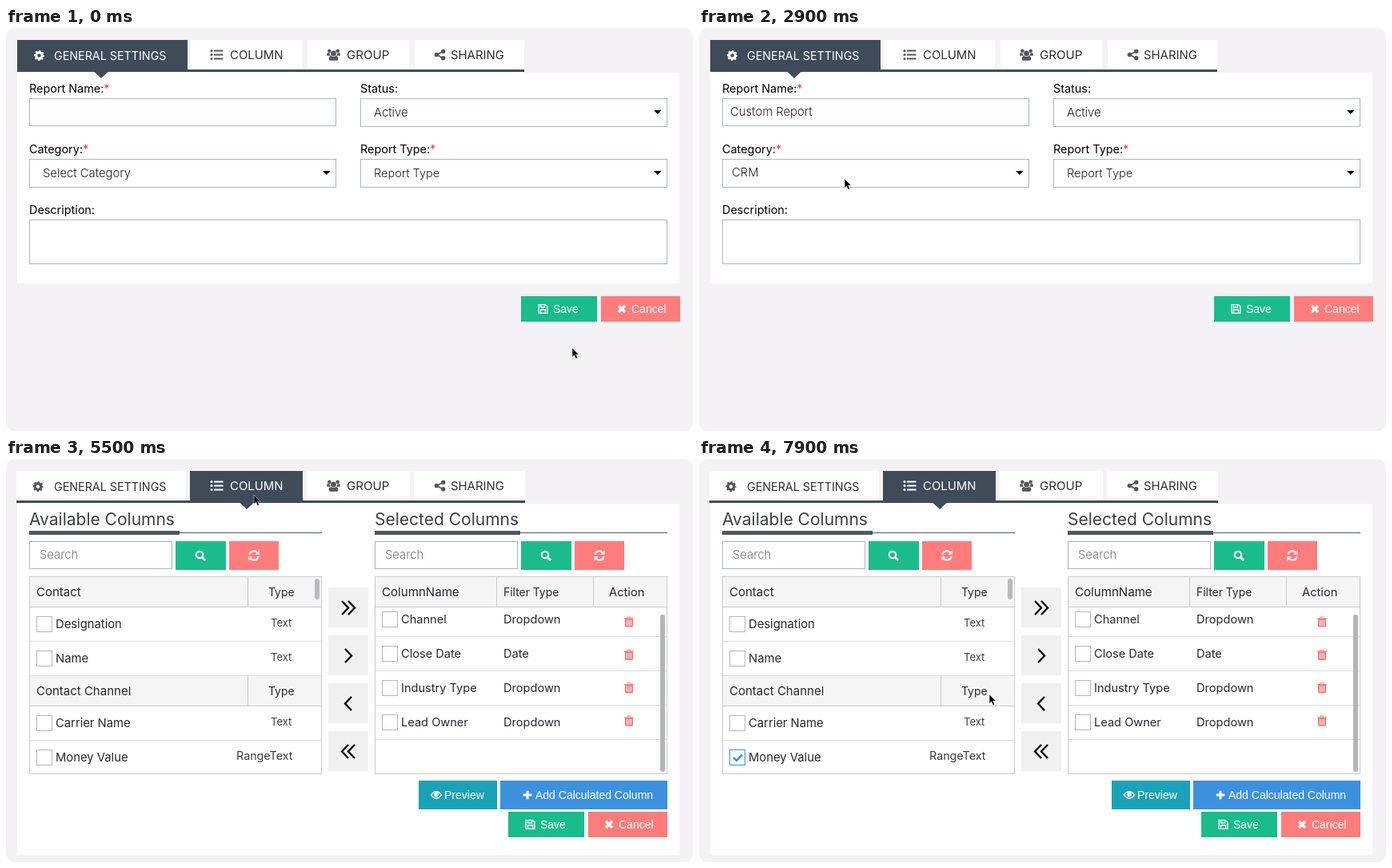
An HTML page that plays this animation: 859x505 px, repeating every 8000 ms.

```html
<!DOCTYPE html>
<html lang="en">
<head>
<meta charset="utf-8">
<title>Report builder</title>
<style>
  html, body { margin: 0; width: 100%; height: 100%; overflow: hidden; background: #fff; }
  svg { display: block; width: 859px; height: 505px; }
  text { font-family: Inter, "Open Sans", sans-serif; white-space: pre; }
  .button { font-family: "Liberation Sans", Arial, sans-serif; }
</style>
</head>
<body>
<svg id="stage" viewBox="0 0 859 505"></svg>
<script>
const LOOP = 8000, STEP = 100;
const DARK = '#3f4b59', GREEN = '#1bbc8b', RED = '#ff7c7c', GREY = '#55565f', INK = '#26282c';

const rect = (x, y, w, h, fill, extra = '') =>
  `<rect x="${x}" y="${y}" width="${w}" height="${h}" fill="${fill}" ${extra}/>`;
const box = (x, y, w, h, stroke = '#adb5bf', fill = '#fff') =>
  rect(x + .5, y + .5, w - 1, h - 1, fill, `stroke="${stroke}"`);
const path = (d, stroke, width = 1) =>
  `<path d="${d}" fill="none" stroke="${stroke}" stroke-width="${width}"/>`;
const text = (x, y, content, size = 14.6, fill = INK, extra = '') =>
  `<text x="${x}" y="${y}" font-size="${size}" fill="${fill}" ${extra}>${content}</text>`;
const light = (x, y, content, size = 14.8, fill = '#222', extra = '') =>
  text(x, y, content, size, fill, `font-weight="300" ${extra}`);

// Icons are centred on 0,0 and take their colour from the enclosing group.
const ICONS = {
  cog: `<g fill="none" stroke="currentColor"><circle r="3.8" stroke-width="3.2"/>
    <circle r="5.5" stroke-width="2.2" stroke-dasharray="2.3 2.02" stroke-dashoffset="1.15"/></g>`,
  list: [-5, 0, 5].map(y => `<circle cx="-6.5" cy="${y}" r="1.5"/>` +
    rect(-3.5, y - 1, 11.5, 2, 'currentColor')).join(''),
  users: `<circle cx="-5.2" cy="-4.8" r="2.3"/><circle cx="5.2" cy="-4.8" r="2.3"/>
    <path d="M-8.3 1.3V-1Q-8.3-2.4-7-2.2H-4.8Q-5 0-3.4 1.3ZM8.3 1.3V-1Q8.3-2.4 7-2.2H4.8Q5 0 3.4 1.3Z"/>
    <circle cy="-1.6" r="3.4"/><path d="M-5.8 5.2Q-5.8 1.5-3 1.5Q0 3.3 3 1.5Q5.8 1.5 5.8 5.2Q5.8 7.3 4 7.3H-4Q-5.8 7.3-5.8 5.2Z"/>`,
  share: `<circle cx="-4.2" r="2.7"/><circle cx="4.2" cy="-4.2" r="2.7"/><circle cx="4.2" cy="4.2" r="2.7"/>` +
    path('M4.2-4.2L-4.2 0L4.2 4.2', 'currentColor', 1.7),
  save: path('M-5.4-5.4H3L5.4-3V5.4H-5.4ZM-3 5V1H3V5M-3-5V-2H2V-5', 'currentColor', 1.3),
  times: path('M-4-4L4 4M4-4L-4 4', 'currentColor', 3.2),
  plus: path('M-5.3 0H5.3M0-5.3V5.3', 'currentColor', 3),
  search: `<circle cx="-1" cy="-1" r="4.2" fill="none" stroke="currentColor" stroke-width="2.2"/>` +
    path('M2 2L6 6', 'currentColor', 2.6),
  refresh: path('M-5.6-1.2A5.5 5.5 0 0 1 4-3.8M5.6 1.2A5.5 5.5 0 0 1-4 3.8', 'currentColor', 2.1) +
    `<path d="M6.6-6.4V-1.2H1.4ZM-6.6 6.4V1.2H-1.4Z"/>`,
  trash: `<path d="M-6-4.8H-2.6L-2-6.6H2L2.6-4.8H6V-3.4H5V5Q5 6.6 3.5 6.6H-3.5Q-5 6.6-5 5V-3.4H-6Z"/>` +
    path('M-2.3-2V4.6M0-2V4.6M2.3-2V4.6', '#fff', 1) + path('M-1.5-5.2H1.5', '#fff', .9),
  eye: path('M-6.5 0Q0-8.4 6.5 0Q0 8.4-6.5 0Z', 'currentColor', 1.5) +
    `<circle cy="-.6" r="2.8"/>`,
};
const icon = (name, x, y, color = '#fff') =>
  `<g transform="translate(${x} ${y})" color="${color}" fill="${color}">${ICONS[name]}</g>`;

const button = (x, y, w, h, fill, name, iconX, label, textX) =>
  rect(x, y, w, h, fill) + icon(name, x + iconX, y + h / 2) +
  text(x + textX, y + h / 2 + 5, label, 14, '#fff', 'class="button"');
const saveCancel = (x, y, gap) =>
  button(x, y, 95, 32, GREEN, 'save', 27.5, 'Save', 40) +
  button(x + gap, y, 99, 32, RED, 'times', 26, 'Cancel', 38);

function tabs(active, left, right, bounds) {
  const labels = [
    ['GENERAL SETTINGS', 60, 'cog', active ? 40 : 41.5, 14.3],
    ['COLUMN', 280, 'list', 263.5, 14.9],
    ['GROUP', 426, 'users', 409.5, 15.1],
    ['SHARING', 556, 'share', 542.5, 14.9],
  ];
  const pointer = active ? 301 : 119;
  return rect(left, 52, right - left, 3, DARK) + labels.map(([label, x, name, iconX, size], i) => {
    const [a, b] = bounds[i], on = i === active, drop = i ? 0 : 1;
    return rect(a, 15, b - a, on ? 40 : 37, on ? DARK : '#fff') +
      icon(name, iconX, 33.5 + drop, on ? '#fff' : GREY) +
      text(x, 39 + drop, label, size, on ? '#fff' : '#2e2f33');
  }).join('') + `<path d="M${pointer - 9} 54.5h18l-9 8.5z" fill="${DARK}"/>`;
}

const label = (x, y, content, required) =>
  text(x, y, content + (required ? '<tspan fill="#e8323c">*</tspan>' : ''), 14.4, '#000');
const select = (x, y) => box(x, y, 384, 36) + `<path d="M${x + 367} ${y + 15}h9.6l-4.8 5z"/>`;

const settingsScene =
  rect(14, 56, 828, 264, '#fff') +
  tabs(0, 14, 648, [[14, 227], [231, 370], [377, 504], [511, 648]]) +
  label(29, 81, 'Report Name:', true) + box(29, 88, 384, 35) +
  label(443, 81, 'Status:') + select(443, 88) + light(460, 111, 'Active') +
  label(29, 157, 'Category:', true) + select(29, 164) +
  label(443, 157, 'Report Type:', true) + select(443, 164) +
  label(29, 233, 'Description:') + box(29, 240, 798, 56) +
  light(39, 110, '', 14.8, '#222', 'id="reportName"') +
  light(46, 187, '', 14.8, '#222', 'id="category"') +
  light(460, 187, '', 14.5, '#222', 'id="reportType"') +
  saveCancel(644, 336, 100);

const LINE = '#c9cacd', HEAD = '#f5f5f6';
const checkbox = (x, y) => box(x, y, 20, 20, '#b3b7bd');
const rule = (x, y) => rect(x, y, 364, 1, '#dcdde0');

const panelTop = (x, title) =>
  text(x, 83, title, 21, '#3d3f45') +
  rect(x, 92, 366, 1, '#4d5864') + rect(x, 90, title[0] === 'A' ? 188 : 182, 5, '#4d5864') +
  box(x, 103, 179, 35) + light(x + 13, 125, 'Search', 14.8, '#777') +
  rect(x + 183, 103, 63, 36, GREEN) + icon('search', x + 214, 121) +
  rect(x + 250, 103, 62, 36, RED) + icon('refresh', x + 281, 121) +
  box(x, 147, 366, 248, LINE);

const header = (x, y, columns) =>
  rect(x + 1, y, 364, 37, HEAD) + rect(x + 1, y + 37, 364, 1, LINE) +
  columns.map(([content, textX, size, divider]) =>
    text(textX, y + 24, content, size) + (divider ? rect(divider, y, 1, 37, LINE) : '')).join('');

const availableRow = (y, name, type, typeX = 331) =>
  checkbox(38, y - 10) + text(62, y + 5, name, 14.8) +
  text(typeX, y + 3, type, type === 'Text' ? 13 : 14.3, '#3a3c40');
const selectedRow = (y, name, filter, i) =>
  checkbox(470, y - 10) + text(494, y + 5, name) + text(622, y + 5, filter) +
  icon('trash', 779, 204 + i * 41.4, RED) + rule(462, y + 21);

function mover(y, direction, twin) {
  const chevron = x => `M${x - 4 * direction} ${y - 8.5}l${8 * direction} 8.5l${-8 * direction} 8.5`;
  return rect(403, y - 25.5, 50, 50, '#f0f0f1') +
    path(twin ? chevron(424) + chevron(432) : chevron(428), '#000', 2.3);
}

const columnsScene =
  rect(14, 56, 828, 440, '#fff') +
  tabs(1, 13, 649, [[13, 225], [230, 371], [376, 505], [510, 649]]) +
  panelTop(29, 'Available Columns') + panelTop(461, 'Selected Columns') +
  header(29, 148, [['Contact', 38, 15, 302], ['Type', 328, 13.9]]) +
  header(29, 272, [['Contact Channel', 38, 15, 302], ['Type', 328, 13.9]]) +
  [228, 271, 352].map(y => rule(30, y)).join('') +
  availableRow(207, 'Designation', 'Text') + availableRow(250, 'Name', 'Text') +
  availableRow(331, 'Carrier Name', 'Text') + availableRow(374, 'Money Value', 'RangeText', 288) +
  rect(386, 150, 6, 26, '#b9babd', 'rx="3"') +
  `<g id="tick">${box(38, 364, 20, 20, '#2f93ea') + path('M43 374l4 4l7-7.5', '#2f93ea', 2.6)}</g>` +
  mover(186.5, 1, true) + mover(246.5, 1) + mover(306.5, -1) + mover(366.5, -1, true) +
  header(461, 148, [['ColumnName', 470, 15.1, 613], ['Filter Type', 622, 13.9, 734], ['Action', 754, 14.7]]) +
  [['Channel', 'Dropdown'], ['Close Date', 'Date'], ['Industry Type', 'Dropdown'], ['Lead Owner', 'Dropdown']]
    .map(([name, filter], i) => selectedRow(201 + i * 43, name, filter, i)).join('') +
  rect(818, 195, 6, 197, '#b4b5b8', 'rx="3"') +
  button(516, 403, 98, 36, '#1aa2b8', 'eye', 22, 'Preview', 32) +
  button(618, 403, 209, 36, '#3c91de', 'plus', 34, 'Add Calculated Column', 44) +
  saveCancel(628, 442, 100);

const $ = id => document.getElementById(id);
$('stage').innerHTML =
  rect(0, 0, 859, 505, '#f4f2f4', 'rx="11"') +
  `<g id="settings">${settingsScene}</g><g id="columns">${columnsScene}</g>
   <path id="cursor" d="M0 0V11.3L2.6 9L4.5 13.4L6.5 12.5L4.6 8.2H8.3Z" stroke="#fff" stroke-width=".5"/>`;

// Each move: first step, number of steps, end point, downward bow of the path.
const START = [708, 401];
const MOVES = [
  [1000, 4, 43, 118, 0],
  [2300, 2, 182, 189, 0],
  [3400, 3, 558, 189, 6.75],
  [4600, 4, 310, 45, 0],
  [6500, 4, 50, 379, 4.6],
  [7800, 2, 363, 295, 0],
];

function cursorAt(t) {
  let [x, y] = START;
  for (const [begin, steps, endX, endY, bow] of MOVES) {
    if (t < begin) break;
    const p = Math.min(1, ((t - begin) / STEP + 1) / steps);
    x += (endX - x) * p;
    y += (endY - y) * p + 4 * bow * p * (1 - p);
  }
  return [x, y];
}

const show = (id, on) => $(id).setAttribute('display', on ? 'inline' : 'none');

function draw(now) {
  const t = Math.floor(now % LOOP / STEP) * STEP;
  show('settings', t < 5500);
  show('columns', t >= 5500);
  show('tick', t >= 7300);
  $('reportName').textContent = t >= 1800 ? 'Custom Report' : '';
  $('category').textContent = t >= 2900 ? 'CRM' : 'Select Category';
  $('category').setAttribute('x', t >= 2900 ? 41 : 46);
  $('category').setAttribute('y', t >= 2900 ? 186 : 187);
  $('reportType').textContent = t >= 4100 ? 'CRM Type' : 'Report Type';
  $('cursor').setAttribute('transform', `translate(${cursorAt(t)})`);
}

const origin = performance.now();
function tick() {
  draw(performance.now() - origin);
  requestAnimationFrame(tick);
}
tick();
</script>
</body>
</html>
```
